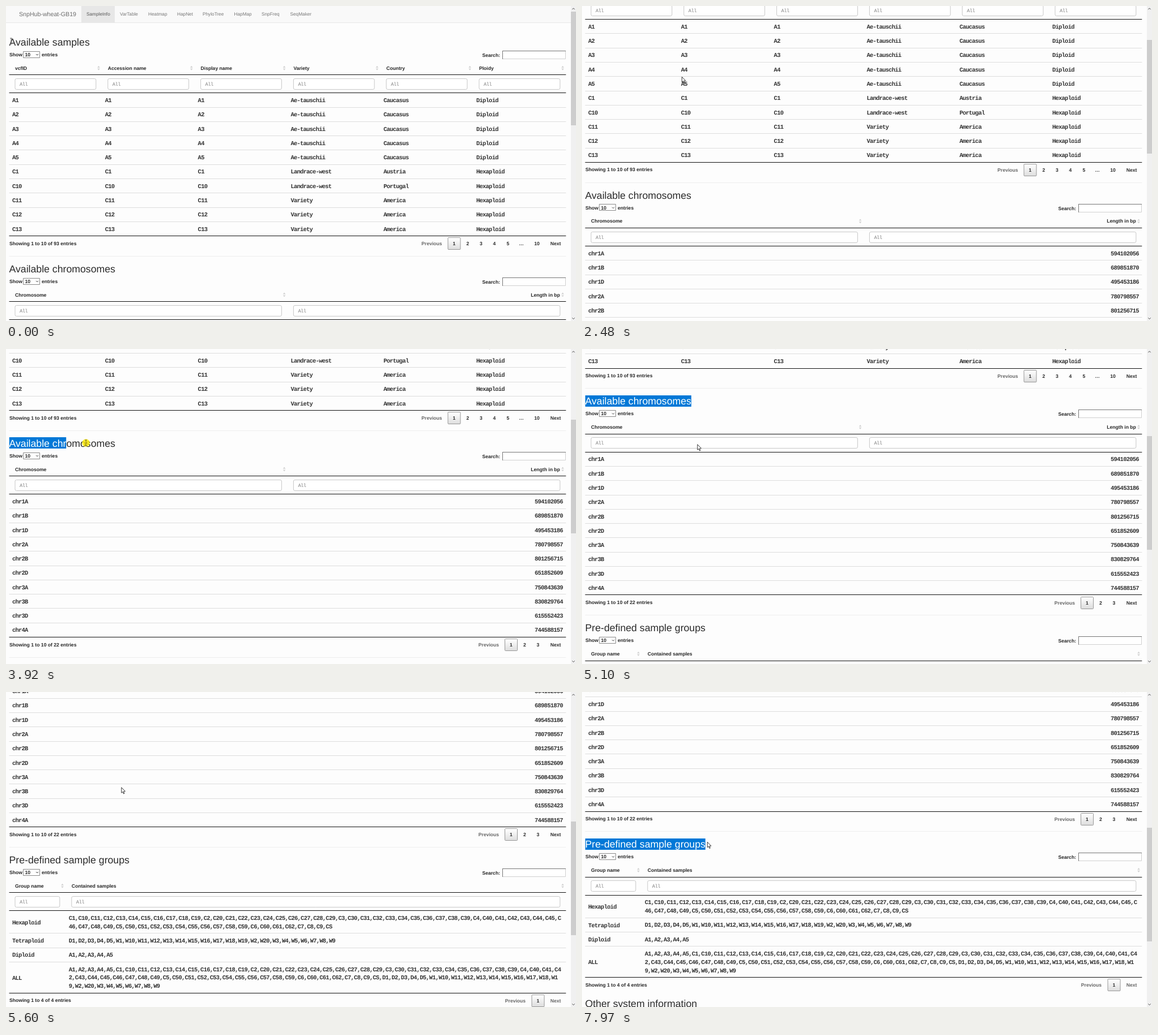
An HTML page with a canvas for the animation above (8000 ms loop, 1006x557 px).

```html
<!DOCTYPE html>
<html lang="en">
<head>
<meta charset="utf-8">
<title>Sample browser</title>
<style>
html, body { margin: 0; width: 100%; height: 100%; overflow: hidden; background: #fdfdfd; }
canvas { display: block; }
</style>
</head>
<body>
<canvas id="stage" width="1006" height="557"></canvas>
<script>
const W = 1006, H = 557, LOOP = 8000, STEP = 62.3;
const LEFT = 5.5, RIGHT = 988.3, ROW = 25.27, LINE = 14.8, BLOCK = 400.9, PITCH = 5.53;
const SANS = '"Liberation Sans", Arial, sans-serif', MONO = '"Liberation Mono", monospace';
const BOLD = `bold 8.6px ${SANS}`, TITLE = `17.7px ${SANS}`;
const c = document.getElementById('stage').getContext('2d');
c.textRendering = 'geometricPrecision';

// Table contents; a wrapped line never starts with a comma
const series = (letter, n) => Array.from({ length: n }, (_, i) => letter + (i + 1));
const groupA = series('A', 5);
const groupC = [...series('C', 62), 'CS'].sort();
const groupD = [...series('D', 5), ...series('W', 20)].sort();
const wrap = ids => ids.join(',').match(/.{1,157}(?!,)/g);

const samples = [...groupA, 'C1', 'C10', 'C11', 'C12', 'C13'].map((id, i) => [
  id, id, id,
  i < 5 ? 'Ae-tauschii' : i < 7 ? 'Landrace-west' : 'Variety',
  i < 5 ? 'Caucasus' : ['Austria', 'Portugal'][i - 5] || 'America',
  i < 5 ? 'Diploid' : 'Hexaploid'
]);
const lengths = [594102056, 689851870, 495453186, 780798557, 801256715,
  651852609, 750843639, 830829764, 615552423, 744588157];
const chromosomes = lengths.map((n, i) => ['chr' + (1 + Math.floor(i / 3)) + 'ABD'[i % 3], String(n)]);
const groups = [
  ['Hexaploid', wrap(groupC)], ['Tetraploid', wrap(groupD)],
  ['Diploid', wrap(groupA)], ['ALL', wrap([...groupA, ...groupC, ...groupD])]
];

const tables = [
  {
    title: 'Available samples', total: 93, rows: samples,
    heads: ['vcfID', 'Accession name', 'Display name', 'Variety', 'Country', 'Ploidy'],
    edges: Array.from({ length: 7 }, (_, i) => LEFT + i * 163.8),
    pages: [['Previous', 751.5], ['1', 791], ['2', 815], ['3', 838.5], ['4', 862],
      ['5', 886], ['…', 909.5], ['10', 937], ['Next', 970]]
  },
  {
    title: 'Available chromosomes', total: 22, rows: chromosomes, numeric: true,
    heads: ['Chromosome', 'Length in bp'], edges: [LEFT, 496.9, RIGHT],
    pages: [['Previous', 852], ['1', 891.5], ['2', 915.5], ['3', 939], ['Next', 970]]
  },
  {
    title: 'Pre-defined sample groups', total: 4, rows: groups, last: true,
    heads: ['Group name', 'Contained samples'], edges: [LEFT, 105.3, RIGHT],
    pages: [['Previous', 899], ['1', 939], ['Next', 970]]
  }
];

// Motion: [time, value...] keys
const scrollKeys = [[2190, 0], [2480, 129.6], [2860, 298], [4860, 298], [5098, 372.6], [5596, 568.7], [5670, 596.5]];
const cursorKeys = [
  [550, 9, 62], [800, 45, 62], [1230, 147, 64], [1640, 147, 64], [2050, 176, 124], [2230, 176, 125],
  [2860, 176, 125], [3220, 8, 161], [3290, 8, 161], [3600, 45, 165], [3852, 106, 166], [3914, 141, 166],
  [3976, 174, 166], [4038, 194, 166], [4101, 208, 166], [4350, 208, 166], [4600, 203.5, 168.5],
  [5740, 203.5, 168.5], [6520, 8, 264], [6590, 8, 264], [6950, 80, 265], [7340, 194, 265],
  [7470, 221, 265]
];
const drags = [[550, 1640], [3285, 4400], [6585, 7700]];

function track(keys, t) {
  const i = keys.findIndex(k => k[0] > t);
  if (i === 0) return keys[0].slice(1);
  if (i < 0) return keys[keys.length - 1].slice(1);
  const a = keys[i - 1], b = keys[i], f = (t - a[0]) / (b[0] - a[0]);
  return a.slice(1).map((v, j) => v + (b[j + 1] - v) * f);
}

function text(s, x, y, font = BOLD, color = '#262626', align = 'left', spacing = 0) {
  c.font = font;
  c.fillStyle = color;
  c.textAlign = align;
  c.letterSpacing = spacing + 'px';
  c.fillText(s, x, y);
}
const cell = (s, x, y) => text(s, x, y + 3.4, `bold 10.5px ${MONO}`, '#333', 'left', PITCH - 6.3);

function rule(y, color) {
  c.fillStyle = color;
  c.fillRect(LEFT, Math.floor(y), RIGHT - LEFT, 1);
}

// Outlined box whose edges sit on whole pixel rows
function box(x, y, w, h, border, fill, r = 0) {
  c.beginPath();
  c.roundRect(x, Math.floor(y) + 0.5, w, h, r);
  c.fillStyle = fill;
  c.fill();
  c.lineWidth = 1;
  c.strokeStyle = border;
  c.stroke();
}

function shape(points, fill) {
  c.beginPath();
  points.forEach(([x, y]) => c.lineTo(x, y));
  c.closePath();
  c.fillStyle = fill;
  c.fill();
}

function chevron(x, y, w, h, color) {
  c.beginPath();
  c.moveTo(x - w, y - h);
  c.lineTo(x, y + h);
  c.lineTo(x + w, y - h);
  c.lineWidth = 1;
  c.strokeStyle = color;
  c.stroke();
}

function sortIcon(x, y) {
  shape([[x - 2.3, y - 0.8], [x, y - 4], [x + 2.3, y - 0.8]], '#d2d2d2');
  shape([[x - 2.3, y + 0.8], [x, y + 4], [x + 2.3, y + 0.8]], '#d2d2d2');
}

function heading(title, y, selectTo) {
  text(title, LEFT, y + 70, TITLE, '#2b2b2b');
  let end = 0;
  for (let n = 1; n <= title.length; n++) {
    const w = c.measureText(title.slice(0, n)).width;
    if (LEFT + w <= selectTo + 4) end = w;
  }
  if (!end) return;
  const top = Math.floor(y + 54);
  c.save();
  c.beginPath();
  c.rect(LEFT, top, end, 20);
  c.clip();
  c.fillStyle = '#0078d7';
  c.fillRect(LEFT, top, end, 20);
  text(title, LEFT, y + 70, TITLE, '#fff');
  c.restore();
}

function pager(pages, y, last) {
  for (const [label, x] of pages) {
    if (label === '1') {
      const g = c.createLinearGradient(0, y - 10, 0, y + 11);
      g.addColorStop(0, '#fff');
      g.addColorStop(1, '#dcdcdc');
      box(x - 11, y - 10.6, 22, 21, '#979797', g, 1);
    }
    const idle = label === 'Previous' || (last && label === 'Next');
    text(label, x, y + 3.1, BOLD, idle ? '#666' : '#2b2b2b', 'center');
  }
}

function table(tb, y, selectTo) {
  const { edges, rows } = tb;
  heading(tb.title, y, selectTo);

  text('Show', 6, y + 89);
  box(30.5, y + 80.2, 29, 11, '#8a8a8a', '#fff');
  text('10', 33.5, y + 89);
  chevron(55, y + 86, 2, 1, '#444');
  text('entries', 63, y + 89);
  text('Search:', 872, y + 90, BOLD, '#262626', 'right');
  const searchTop = Math.floor(y + 79.3);
  box(876.5, searchTop, 111, 14, '#d0d0d0', '#fff');
  c.fillStyle = '#767676';
  c.fillRect(876, searchTop, 112, 1);
  c.fillRect(876, searchTop, 1, 15);

  tb.heads.forEach((h, i) => {
    const x0 = edges[i] + 10.5, x1 = edges[i + 1] - 10.5, right = tb.numeric && i === 1;
    text(h, right ? x1 : x0, y + 112.6, BOLD, '#262626', right ? 'right' : 'left');
    sortIcon(x1 + 4.7, y + 109.7);
    box(x0, y + 128.3, x1 - x0, 19, '#c8c8c8', '#fff', 2.5);
    text('All', x0 + 8, y + 141, `8.8px ${MONO}`, '#808080', 'left', -0.6);
  });
  rule(y + 121.9, '#111');

  const first = y + 153.9;
  let top = first;
  rows.forEach((row, n) => {
    const count = Array.isArray(row[1]) ? row[1].length : 1;
    const h = ROW + (count - 1) * LINE;
    if (n) rule(top, '#ddd');
    row.forEach((value, i) => {
      if (Array.isArray(value)) {
        value.forEach((s, k) => cell(s, edges[i] + 5.5, top + 12.8 + k * LINE));
      } else {
        const x = tb.numeric && i ? RIGHT - 5.5 - value.length * PITCH : edges[i] + 5.5;
        cell(value, x, top + h / 2 + 0.2);
      }
    });
    top += h;
  });
  rule(first, '#111');
  rule(top, '#111');

  text(`Showing 1 to ${Math.min(10, tb.total)} of ${tb.total} entries`, 6, top + 16);
  pager(tb.pages, top + 13.7, tb.last);
  if (!tb.last) rule(top + 35.9, '#eee');
}

function navbar(y) {
  c.fillStyle = '#f9f9f9';
  c.fillRect(0, y, W, 29);
  c.fillStyle = '#e7e7e7';
  c.fillRect(0, y + 29, W, 1);
  c.fillRect(133, y, 59, 29);
  text('SnpHub-wheat-GB19', 23, y + 18, `10.63px ${SANS}`, '#6e6e6e');
  const items = [['SampleInfo', 142], ['VarTable', 201], ['Heatmap', 251], ['HapNet', 302],
    ['PhyloTree', 347], ['HapMap', 402.5], ['SnpFreq', 451], ['SeqMaker', 501.5]];
  items.forEach(([s, x], i) => text(s, x, y + 17.2, `8.26px ${SANS}`, i ? '#777' : '#555'));
}

function scrollbar(s) {
  c.fillStyle = '#f0f0f0';
  c.fillRect(997, 0, 9, H);
  c.fillStyle = '#cdcdcd';
  c.fillRect(997, Math.round(9.7 + s * 0.386), 9, 201);
  chevron(1001.5, 5, 2.2, -1.2, '#505050');
  chevron(1001.5, 552.5, 2.2, 1.2, '#505050');
}

function pointer(x, y, beam, pressed) {
  if (pressed) {
    c.beginPath();
    c.arc(x, y, 6.8, 0, 7);
    c.fillStyle = 'rgba(255, 235, 0, 0.8)';
    c.fill();
  }
  c.lineWidth = 1;
  c.beginPath();
  if (beam) {
    c.moveTo(x - 2, y - 5); c.lineTo(x + 2, y - 5);
    c.moveTo(x, y - 5); c.lineTo(x, y + 5);
    c.moveTo(x - 2, y + 5); c.lineTo(x + 2, y + 5);
    c.strokeStyle = pressed ? '#6b6420' : '#666';
    c.stroke();
    return;
  }
  const outline = [[0, 0], [0, 9.6], [2.1, 7.6], [3.7, 11.2], [5.1, 10.6], [3.6, 7.1], [6.6, 6.9]];
  shape(outline.map(([dx, dy]) => [x + dx + 0.3, y + dy + 0.3]), '#fff');
  c.lineWidth = 0.9;
  c.strokeStyle = '#222';
  c.stroke();
}

function draw(time) {
  const t = 550 + STEP * Math.floor((time - 550) / STEP + 0.13);
  const [s] = track(scrollKeys, t), [x, y] = track(cursorKeys, t);
  const active = drags.findLastIndex(d => t >= d[0]);
  const pressed = active >= 0 && t < drags[active][1];
  const beam = pressed || t < 550 || drags.some(d => t > d[0] - 90 && t < d[1]);

  c.fillStyle = '#fdfdfd';
  c.fillRect(0, 0, W, H);
  navbar(-s);
  tables.forEach((tb, i) => {
    const selectTo = i === active ? track(cursorKeys, Math.min(t, drags[i][1]) - STEP)[0] : 0;
    table(tb, i * BLOCK - s, selectTo);
  });
  heading('Other system information', 1083.7 - s, 0);
  scrollbar(s);
  pointer(x, y, beam, pressed);
}

const start = performance.now();
function tick() {
  draw((performance.now() - start) % LOOP);
  requestAnimationFrame(tick);
}
tick();
</script>
</body>
</html>
```
